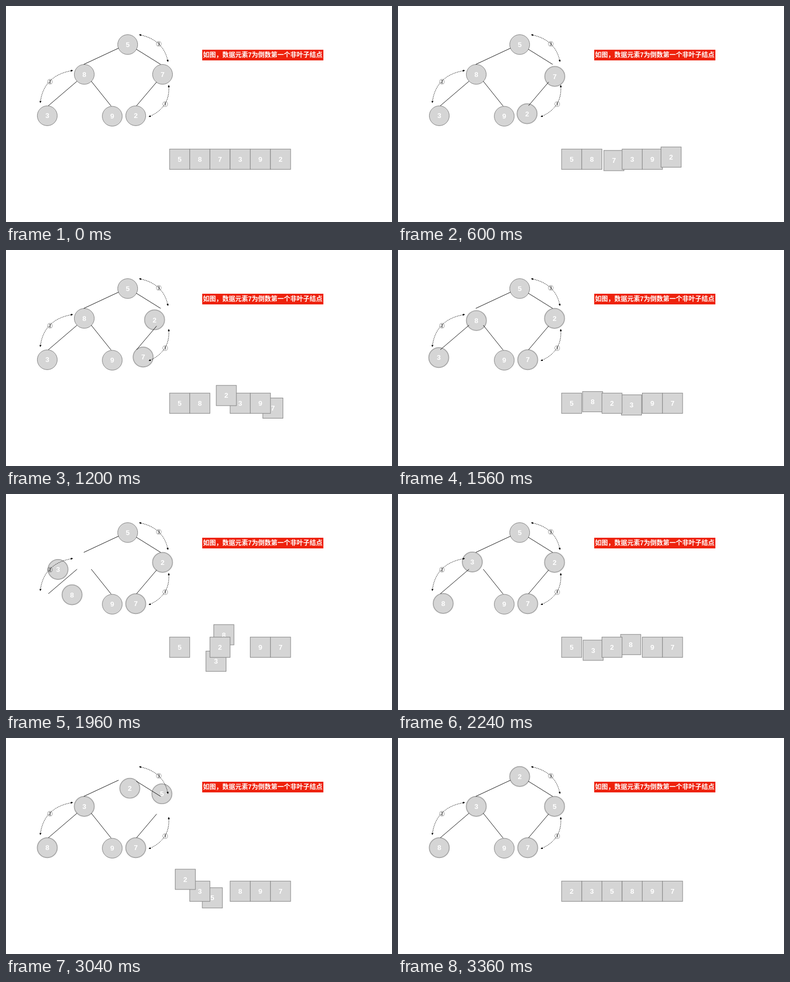
Write an HTML page that moves like this. It is 720 by 405 pixels and loops after 3880 ms.

```html
<!DOCTYPE html>
<html lang="zh-CN">
<head>
<meta charset="utf-8">
<style>
  html, body { margin: 0; width: 100%; height: 100%; overflow: hidden; background: #fff; }
  svg { display: block; font-family: "Liberation Sans", "Noto Sans CJK SC", "Noto Sans CJK", sans-serif; }
  .node { fill: #d5d5d5; stroke: #858585; }
  .moved .node { stroke: #a6a6a6; stroke-width: 1.7; }
  .digit { fill: #fff; font-size: 13px; font-weight: bold; text-anchor: middle; }
  .edges { stroke: #1c1c1c; }
  .hints path { fill: none; stroke: #000; stroke-dasharray: 1.7 1.5; marker-start: url(#tip); marker-end: url(#tip); }
  .hints text { font: 10px "Noto Sans CJK SC", "Noto Sans CJK", sans-serif; text-anchor: middle; }
  .label { fill: #fff; font-size: 12px; font-weight: bold; }
</style>
</head>
<body>
<svg width="720" height="405" viewBox="0 0 720 405">
  <marker id="tip" viewBox="0 0 4 4" refX="3" refY="2" markerWidth="4" markerHeight="4" orient="auto-start-reverse">
    <path d="M0 0L4 2L0 4z"/>
  </marker>
  <g id="circles"></g>
  <path class="edges" d="M210 79L145 109.5M243 81L288.5 109.5M132.5 141L79 187M159 141L196 187.5M281 142.5L243.5 187"/>
  <g class="hints">
    <path d="M249 54Q294 63 302 104"/>
    <path d="M124 121Q70 130 64 181"/>
    <path d="M303.5 149Q307 190 267 207.5"/>
    <text x="285" y="74.5">③</text>
    <text x="82" y="145.5">②</text>
    <text x="297" y="187.5">①</text>
  </g>
  <g id="squares"></g>
  <rect x="366" y="82" width="226" height="20" fill="#ee220c"/>
  <text class="label" x="367.5" y="96.4">如图，数据元素7为倒数第一个非叶子结点</text>
</svg>
<script>
const LOOP = 3880, TICK = 40, START = 480, MOVE_TICKS = 24;
const values = [5, 8, 7, 3, 9, 2];
const treeSlots = [[227, 72.3], [146, 128.2], [292, 128.2], [77, 205.8], [198.2, 206.7], [242, 205.8]];
const arraySlots = values.map((_, i) => [323.9 + i * 37.64, 287.3]);

// Each path is [reach along the chord, sideways bulge] of its Bezier handles.
const swaps = [
  { value: 7, from: 2, to: 5, tree: [.34, 27], array: [.34, -28] },
  { value: 2, from: 5, to: 2, tree: [.28, 33.6], array: [.25, -44] },
  { value: 8, from: 1, to: 3, tree: [.3, 32], array: [.2, 32] },
  { value: 3, from: 3, to: 1, tree: [.24, 38], array: [.17, 36] },
  { value: 5, from: 0, to: 2, tree: [.22, 33], array: [.22, -24] },
  { value: 2, from: 2, to: 0, tree: [.26, 27], array: [.05, -43] }
].map((swap, i) => ({ ...swap, round: i >> 1 }));

const circle = '<circle class="node" r="18.6"/>';
const square = '<rect class="node" x="-18.8" y="-19" width="37.6" height="38"/>';

function build(id, shape) {
  const parent = document.getElementById(id);
  parent.innerHTML = values.map(v => `<g>${shape}<text class="digit" y="4.6">${v}</text></g>`).join('');
  return [...parent.children];
}

const circles = build('circles', circle);
const squares = build('squares', square);

const ease = t => t < .5 ? 2 * t * t : 1 - 2 * (1 - t) ** 2;

function arc([ax, ay], [bx, by], [reach, bulge], u) {
  const dx = bx - ax, dy = by - ay, length = Math.hypot(dx, dy);
  const b1 = 3 * u * (1 - u) ** 2, b2 = 3 * u * u * (1 - u);
  const along = b1 * reach + b2 * (1 - reach) + u ** 3;
  const side = bulge * (b1 + b2) / length;
  return [ax + dx * along + dy * side, ay + dy * along - dx * side];
}

function place(el, [x, y]) {
  el.setAttribute('transform', `translate(${x.toFixed(2)} ${y.toFixed(2)})`);
}

function draw(time) {
  const step = Math.min(72, Math.max(0, Math.floor((time - START) / TICK)));
  values.forEach((value, i) => {
    let treePos = treeSlots[i], arrayPos = arraySlots[i], moved = false;
    for (const { value: v, round, from, to, tree, array } of swaps) {
      const t = (step - round * MOVE_TICKS) / MOVE_TICKS;
      if (v !== value || t <= 0) continue;
      const u = ease(Math.min(1, t));
      treePos = arc(treeSlots[from], treeSlots[to], tree, u);
      arrayPos = arc(arraySlots[from], arraySlots[to], array, u);
      moved = true;
    }
    place(circles[i], treePos);
    place(squares[i], arrayPos);
    circles[i].classList.toggle('moved', moved);
  });
}

function frame() {
  draw(performance.now() % LOOP);
  requestAnimationFrame(frame);
}
frame();
</script>
</body>
</html>
```
